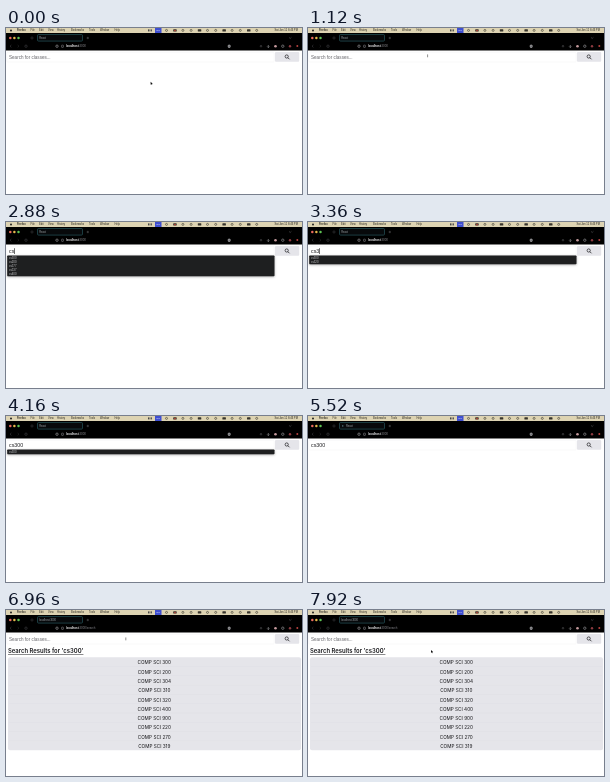
Animation of 296 by 166 pixels, one loop 8000 ms. Source, as an HTML page with a canvas:

```html
<!DOCTYPE html>
<html lang="en">
<head>
<meta charset="utf-8">
<title>Class search</title>
<style>
  html, body { margin: 0; width: 100%; height: 100%; overflow: hidden; background: #fff; }
  canvas { display: block; width: 296px; height: 166px; }
</style>
</head>
<body>
<canvas id="stage"></canvas>
<script>
const W = 296, H = 166, LOOP = 8000;
const canvas = document.getElementById('stage');
const ctx = canvas.getContext('2d');
const dpr = window.devicePixelRatio || 1;
canvas.width = W * dpr;
canvas.height = H * dpr;

const SANS = '"Liberation Sans", Arial, sans-serif';
const UI = 'Inter, sans-serif';

// Each entry is [start time, value]; a value holds until the next entry.
const typed = [[0, ''], [2400, 'c'], [2800, 'cs'], [3280, 'cs3'], [3600, 'cs30'], [4000, 'cs300'], [6960, '']];
const suggestions = [[0, 0], [2560, 6], [2800, 5], [3280, 2], [3600, 1], [4720, 0]];
const caret = [[0, 0], [1200, 1], [1840, 0], [2560, 1], [3040, 0], [3280, 1], [4160, 0],
  [4720, 1], [5280, 0], [5840, 1], [6320, 0], [6560, 1], [6960, 0]];
const tabTitle = [[0, 'React'], [6000, 'localhost:3000']];
const pointerPath = [[80, 145, 54.4], [880, 120, 29], [1280, 119.4, 27], [6880, 119.4, 27],
  [7200, 122, 38], [7520, 122, 38], [7920, 123.4, 40.6]];
const courses = [300, 200, 304, 310, 320, 400, 900, 220, 270, 319];

function valueAt(steps, t) {
  let value = steps[0][1];
  for (const [start, next] of steps) if (t >= start) value = next;
  return value;
}

function rect(x, y, w, h, color) {
  ctx.fillStyle = color;
  ctx.fillRect(x, y, w, h);
}

function rounded(x, y, w, h, r, fill, stroke, line = 0.5) {
  ctx.beginPath();
  ctx.roundRect(x, y, w, h, r);
  if (fill) { ctx.fillStyle = fill; ctx.fill(); }
  if (stroke) { ctx.strokeStyle = stroke; ctx.lineWidth = line; ctx.stroke(); }
}

function dot(x, y, r, color) {
  ctx.fillStyle = color;
  ctx.beginPath();
  ctx.arc(x, y, r, 0, Math.PI * 2);
  ctx.fill();
}

function ring(x, y, r, color, line) {
  ctx.strokeStyle = color;
  ctx.lineWidth = line;
  ctx.beginPath();
  ctx.arc(x, y, r, 0, Math.PI * 2);
  ctx.stroke();
}

function path(points, color, line) {
  ctx.strokeStyle = color;
  ctx.lineWidth = line;
  ctx.beginPath();
  points.forEach(([x, y]) => ctx.lineTo(x, y));
  ctx.stroke();
}

// Draws text on its baseline and returns its width.
function text(str, x, y, size, color, { family = SANS, weight = 400, align = 'left' } = {}) {
  ctx.font = `${weight} ${size}px ${family}`;
  ctx.textAlign = align;
  ctx.fillStyle = color;
  ctx.fillText(str, x, y);
  return ctx.measureText(str).width;
}

function drawMenuBar() {
  rect(0, 0, W, 5, '#ddd3b2');
  dot(5, 2.4, 1, '#222');
  const menus = { Firefox: 11, File: 24.5, Edit: 33, View: 42, History: 51, Bookmarks: 65, Tools: 83, Window: 94, Help: 108.5 };
  for (const [name, x] of Object.entries(menus)) {
    text(name, x, 3.4, 2.6, '#27251f', { weight: name === 'Firefox' ? 700 : 400 });
  }
  rect(142, 1.4, 1.5, 2, '#444');
  rect(144.5, 1.4, 1.5, 2, '#555');
  rect(149, 0, 6.5, 5, '#3f4fd0');
  text('EN', 150.5, 3.4, 2.5, '#eef');
  for (let i = 0; i < 12; i++) {
    const x = 159.5 + i * 8.2;
    if (i % 3 === 1) rounded(x - 0.5, 1.2, 3.5, 2.4, 0.6, '#37342c');
    else ring(x + 1, 2.4, 1, '#37342c', 0.6);
  }
  dot(169, 2.6, 0.9, '#b8483a');
  text('Sat Jan 11 8:46 PM', 268.5, 3.4, 2.7, '#27251f');
}

function drawTab(t) {
  rounded(31.5, 6.5, 45, 6.6, 1, '#07090b', '#2d6268', 0.6);
  const loading = t >= 4720 && t < 6960;
  if (loading) {
    const swing = 0.5 - 0.5 * Math.cos(t / 480 * Math.PI);
    dot(33.8 + swing * 2, 9.9, 0.6, '#7ca9b5');
  }
  text(valueAt(tabTitle, t), loading ? 38 : 33.2, 11, 2.6, '#a2a7ab');
}

function drawBrowser(t) {
  rect(0, 5, W, 17.5, '#000');
  ['#ec6a5e', '#e5b84b', '#5fc454'].forEach((color, i) => dot(4.3 + i * 4.1, 10, 1.25, color));
  ring(26, 10, 1.1, '#454548', 0.5);
  drawTab(t);
  path([[80.6, 10], [83, 10]], '#68686c', 0.5);
  path([[81.8, 8.8], [81.8, 11.2]], '#68686c', 0.5);
  path([[283, 9.4], [284.2, 10.5], [285.4, 9.4]], '#68686c', 0.5);

  path([[5.4, 17], [4, 18.2], [5.4, 19.4]], '#4b4b4f', 0.5);
  path([[11.6, 17], [13, 18.2], [11.6, 19.4]], '#303033', 0.5);
  ring(20, 18.2, 1.2, '#4b4b4f', 0.5);
  ring(51, 18.2, 1.2, '#a6a6aa', 0.6);
  rounded(55.6, 17.1, 1.8, 2.3, 0.4, null, '#96969a');
  const hostWidth = text('localhost', 60, 19.3, 2.9, '#f2f2f4', { weight: 700 });
  text(t >= 6000 ? ':3000/search' : ':3000', 60 + hostWidth, 19.3, 2.9, '#85858a');

  rounded(222.2, 17.1, 2, 2.3, 0.5, '#5c5c60', '#d2d2d5', 0.6);
  ring(255, 18.2, 0.8, '#5e5e62', 0.5);
  path([[262.3, 17], [262.3, 19.6]], '#a8a8ab', 0.6);
  path([[261.1, 18.4], [262.3, 19.6], [263.5, 18.4]], '#a8a8ab', 0.5);
  dot(269.5, 18.2, 1.3, '#c59a9d');
  ring(276.8, 18.2, 1.2, '#a2a2a5', 0.6);
  dot(284, 18.3, 1.2, '#8c3a40');
  dot(291.3, 18, 1, '#b8423f');
}

function drawSearch(t) {
  rounded(0.8, 24.2, 267.4, 9.8, 1, '#fff', '#f1f1f3');
  rounded(269, 24, 24.2, 9.8, 1, '#e5e5ea');
  ring(280.7, 28.5, 1.6, '#222226', 0.75);
  path([[281.9, 29.7], [283.5, 31.3]], '#222226', 0.8);

  const value = valueAt(typed, t);
  let width = 0;
  if (value) width = text(value, 3, 31, 5.3, '#1d1d20');
  else text('Search for classes...', 3, 30.9, 4.6, '#66666b');
  if (valueAt(caret, t)) rect(3.1 + width, 26.2, 0.6, 5.8, '#111');
}

function drawSuggestions(t) {
  const count = valueAt(suggestions, t);
  if (!count) return;
  const names = count > 2 ? ['cs300', 'cs200', 'cs577', 'cs537', 'cs400', 'comp'] : ['cs300', 'cs320'];
  ctx.save();
  ctx.shadowColor = 'rgba(0,0,0,.35)';
  ctx.shadowBlur = 2.5 * dpr;
  ctx.shadowOffsetY = 0.7 * dpr;
  rounded(1.2, 33.6, 267.3, count * 4 + 0.7, 0.7, '#1e1f20');
  ctx.restore();
  for (let i = 0; i < count; i++) text(names[i], 3, 37 + i * 4, 2.8, '#c9c9cb');
}

function drawResults() {
  const width = text("Search Results for 'cs300'", 2, 43.2, 5.9, '#17171a', { family: UI, weight: 600 });
  rect(2, 44.2, width, 0.5, '#17171a');
  rounded(2, 47.2, 293, 93, 2, '#e5e5ea');
  courses.forEach((number, i) => {
    const y = 47.2 + i * 9.3;
    if (i) rect(3, y - 0.2, 291, 0.4, '#dcdce2');
    text(`COMP SCI ${number}`, 148.3, y + 7.1, 4.7, '#111114', { family: UI, align: 'center' });
  });
}

function pointerAt(t) {
  let [, x, y] = pointerPath[0];
  for (let i = 1; i < pointerPath.length; i++) {
    const [t0, x0, y0] = pointerPath[i - 1];
    const [t1, x1, y1] = pointerPath[i];
    if (t < t0) break;
    const p = Math.min(1, (t - t0) / (t1 - t0));
    const eased = p * p * (3 - 2 * p);
    x = x0 + (x1 - x0) * eased;
    y = y0 + (y1 - y0) * eased;
  }
  return [x, y];
}

function drawPointer(t) {
  if (t >= 2400 && t < 6240) return;
  const [x, y] = pointerAt(t);
  if (y < 33) {
    path([[x, y - 1.3], [x, y + 1.6]], '#444', 0.6);
    return;
  }
  ctx.beginPath();
  [[0, 0], [0, 3], [0.7, 2.4], [1.2, 3.4], [1.7, 3.1], [1.3, 2.2], [2.1, 2.1]]
    .forEach(([dx, dy]) => ctx.lineTo(x - 0.4 + dx, y - 0.7 + dy));
  ctx.closePath();
  ctx.fillStyle = '#111';
  ctx.fill();
}

function frame(now) {
  const t = now % LOOP;
  ctx.setTransform(dpr, 0, 0, dpr, 0, 0);
  rect(0, 0, W, H, '#fff');
  drawMenuBar();
  drawBrowser(t);
  drawSearch(t);
  drawSuggestions(t);
  if (t >= 6960) drawResults();
  drawPointer(t);
  requestAnimationFrame(frame);
}
requestAnimationFrame(frame);
</script>
</body>
</html>
```
